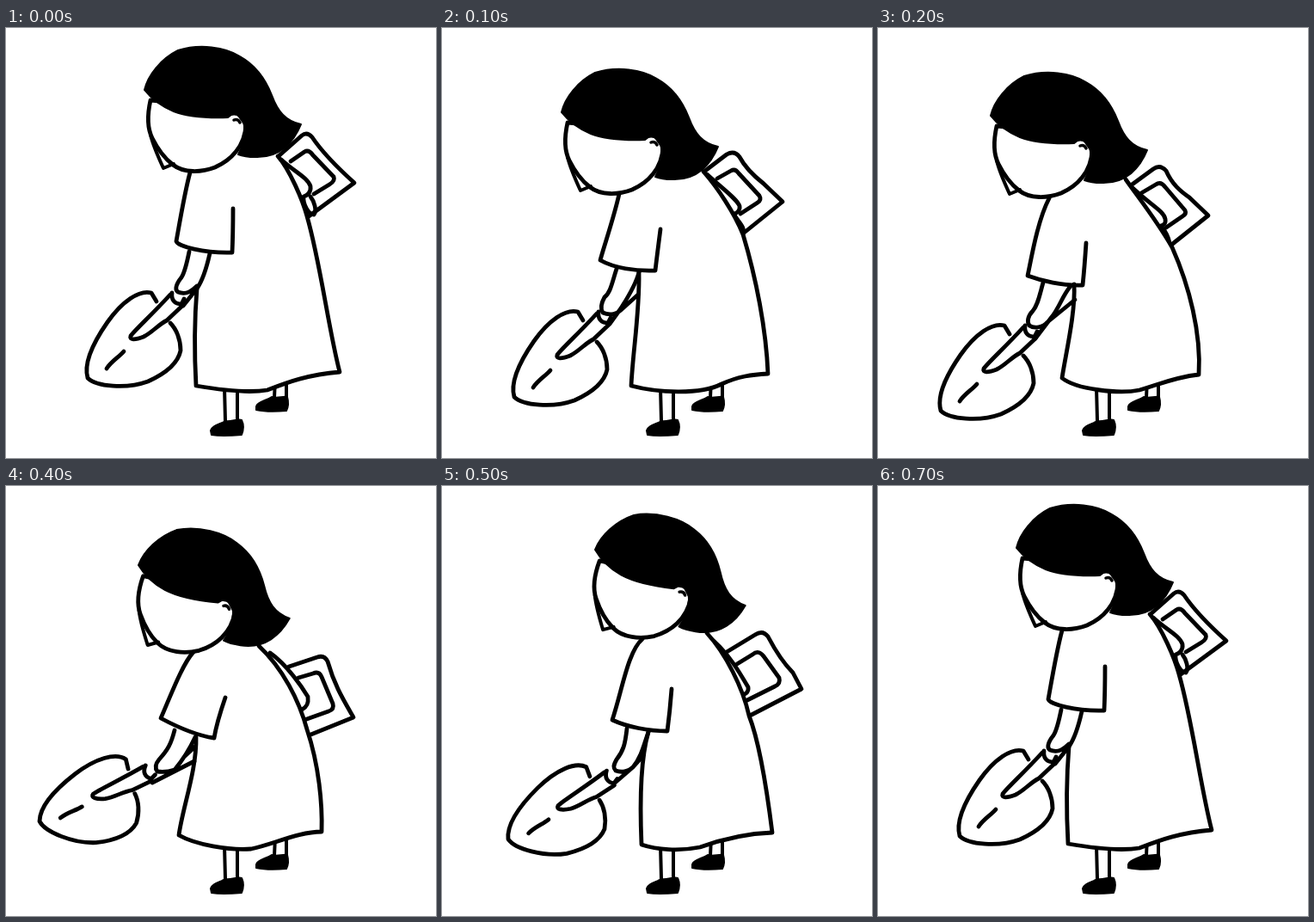
Animation of 500 by 500 pixels, one loop 800 ms. Source, as an HTML page:

```html
<!DOCTYPE html>
<html lang="en">
<head>
<meta charset="utf-8">
<title>Digging</title>
<style>
  html, body { margin: 0; width: 100%; height: 100%; overflow: hidden; background: #fff; }
  svg { display: block; width: 100%; height: 100%; }
  .ink { fill: none; stroke: #000; stroke-width: 4.8; stroke-linecap: round; stroke-linejoin: round; }
  .pose { display: none; }
  .pose.on { display: inline; }
  .dress, .face { fill: #fff; }
  .solid { fill: #000; stroke-width: 2; }
</style>
</head>
<body>
<svg viewBox="0 0 500 500">
  <defs>
    <!-- Origin: front tip of the hair -->
    <g id="head">
      <path class="face" d="M7 12C3 30 3 44 9 56C15 68 24 80 33 87C46 97 66 96 82 90C100 82 117 66 118 40L104 20Z"/>
      <path d="M7 52C10 65 17 80 22 91L34 86" stroke-width="4"/>
      <path class="solid" d="M0 0C4 -17 19 -36 39 -46C64 -54 94 -50 111 -39C129 -29 141 -12 148 6C155 25 164 36 182 40C174 60 158 79 129 78C122 78 114 77 109 75C115 65 117 53 116 42C115 32 108 27 101 29L97 32C69 33 50 31 34 25C19 19 7 9 0 0Z"/>
      <path d="M104 35Q109 33 111 38" stroke-width="3.5"/>
    </g>
    <!-- Origin: lower end of the shaft, on the blade -->
    <g id="shovel">
      <path d="M30 -43L24 -53C10 -57 -10 -43 -27 -19C-43 4 -55 29 -50 46C-40 56 -5 59 20 50C40 41 55 29 58 14C58 1 53 -11 46 -18"/>
      <path d="M-28 35C-22 26 -14 22 -8 15"/>
      <path d="M46 -51C25 -28 5 -10 0 -3C-2 2 5 2 15 -2C25 -7 32 -16 42 -21L60 -38"/>
      <path d="M48 -53C47 -45 51 -40 59 -40L62 -46"/>
    </g>
  </defs>

  <g class="ink">
    <path d="M254 418L255 457M269 418L269 457M313 408L312 430M326 408L326 430" stroke-width="4"/>
    <path class="solid" d="M238 468C240 462 248 461 255 457C262 458 270 454 274 456C277 462 276 468 274 473C262 474 245 474 239 473Z"/>
    <path class="solid" d="M291 440C293 434 302 434 309 429C315 431 322 428 327 429C329 436 328 441 326 445C315 446 300 446 291 444Z"/>

    <g class="pose">
      <path d="M318 148L344 125Q350 120 356 127C368 145 385 162 405 180L352 219"/>
      <path d="M331 155L347 144Q352 141 357 148L381 173Q383 178 376 182L358 193"/>
      <path d="M320 153C335 167 351 174 354 184C355 191 350 195 346 196C345 205 352 217 358 217C362 212 358 201 354 196"/>
      <path class="dress" d="M222 303C219 340 219 380 221 416C250 421 280 425 304 421C325 413 350 403 388 400C375 350 365 270 350 219C345 200 330 165 316 149"/>
      <path d="M214 168C208 190 203 220 198 248C200 254 230 262 263 261Q264 240 264 210"/>
      <path d="M213 260C210 275 208 284 204 290C196 300 197 305 200 307C210 311 217 305 222 300M237 262C233 280 229 293 222 303L206 323"/>
      <use href="#shovel" transform="translate(145 361)"/>
      <use href="#head" transform="translate(161 72)"/>
    </g>

    <g class="pose">
      <path d="M306 166L331 147Q340 142 346 150C354 165 365 174 374 181L396 202L350 239"/>
      <path d="M320 175L336 166Q341 163 345 169L369 195Q372 200 367 203L347 216"/>
      <path d="M308 170C330 190 343 199 346 207C347 213 342 216 339 216C344 225 353 231 350 240"/>
      <path class="dress" d="M229 284C230 330 222 375 220 416C250 424 300 427 325 414C345 405 360 403 379 402C377 350 365 290 350 240C340 215 320 185 304 167"/>
      <path d="M206 193C200 220 188 255 184 270C200 279 225 283 248 282Q250 265 254 234"/>
      <path d="M203 280C198 295 196 308 189 313C184 322 185 328 187 331C196 335 204 332 208 328L228 310M229 284C225 300 213 318 208 326L195 344"/>
      <use href="#shovel" transform="translate(134 383)"/>
      <use href="#head" transform="translate(139 98)"/>
    </g>

    <g class="pose">
      <path d="M294 183L320 164Q328 158 335 166C342 182 352 190 362 197L384 218L340 253"/>
      <path d="M306 192L323 182Q329 178 334 185L357 212Q359 216 354 219L335 232"/>
      <path d="M292 182C315 205 332 212 334 222C335 228 332 229 329 230C334 236 338 244 339 250"/>
      <path class="dress" d="M228 298C230 330 218 380 214 407C230 420 280 426 304 421C325 415 345 406 373 403C376 355 362 300 342 255C325 225 305 200 288 176"/>
      <path d="M199 198C185 225 178 270 174 288C190 294 215 300 238 299Q240 280 242 250"/>
      <path d="M192 296C188 310 186 322 180 329C174 335 173 342 176 346C182 350 192 348 197 342L229 316M224 300C214 312 211 325 202 336L183 361"/>
      <use href="#shovel" transform="translate(123 399)"/>
      <use href="#head" transform="translate(131 102)"/>
    </g>

    <g class="pose">
      <path d="M329 210L362 199Q370 196 374 204C382 232 392 248 404 269L352 290"/>
      <path d="M340 223L357 218Q364 215 367 222L380 253Q382 260 375 262L347 272"/>
      <path d="M307 194C327 208 345 235 351 245C352 253 350 257 344 260"/>
      <path class="dress" d="M221 292C222 330 205 375 201 406C220 417 260 424 285 422C310 417 340 402 367 402C368 370 364 325 350 283C341 250 322 212 294 186"/>
      <path d="M218 193C205 207 191 245 180 270C195 278 220 290 242 293Q245 275 255 246"/>
      <path d="M196 284C192 300 188 307 178 318C173 324 173 328 176 332C183 333 190 332 196 330C206 318 214 305 220 292M170 345L219 320M207 315L220 303"/>
      <use href="#shovel" transform="translate(100.5 361) rotate(17.5)"/>
      <use href="#head" transform="translate(154 92) rotate(7)"/>
    </g>

    <g class="pose">
      <path d="M331 193L364 173Q373 167 379 175C390 196 398 207 408 217L418 236L358 267"/>
      <path d="M343 207L361 196Q368 190 374 198L392 223Q394 230 387 233L353 250"/>
      <path d="M309 175C331 190 348 220 356 234C357 240 352 243 348 243"/>
      <path class="dress" d="M240 286C230 320 230 370 232 417C250 423 275 425 300 420C325 411 355 404 384 403C378 355 370 300 357 267C350 235 330 195 308 171"/>
      <path d="M233 178C216 192 209 240 198 272C215 280 240 285 262 285Q265 262 267 236"/>
      <path d="M215 282C213 300 211 308 203 318C199 325 199 328 202 331C210 334 218 331 222 327L232 316M240 286C235 300 232 315 222 327L200 346"/>
      <use href="#shovel" transform="translate(134.5 374.5) rotate(10.5)"/>
      <use href="#head" transform="translate(178 74) rotate(8)"/>
    </g>
  </g>
</svg>
<script>
  const poses = [...document.querySelectorAll('.pose')];
  const order = [0, 1, 2, 2, 3, 4, 4, 0]; // one pose per step
  const stepMs = 100;
  const start = performance.now();

  function draw(now) {
    const step = Math.floor(Math.max(0, now - start) / stepMs) % order.length;
    poses.forEach((pose, i) => pose.classList.toggle('on', i === order[step]));
    requestAnimationFrame(draw);
  }
  draw(start);
</script>
</body>
</html>
```
